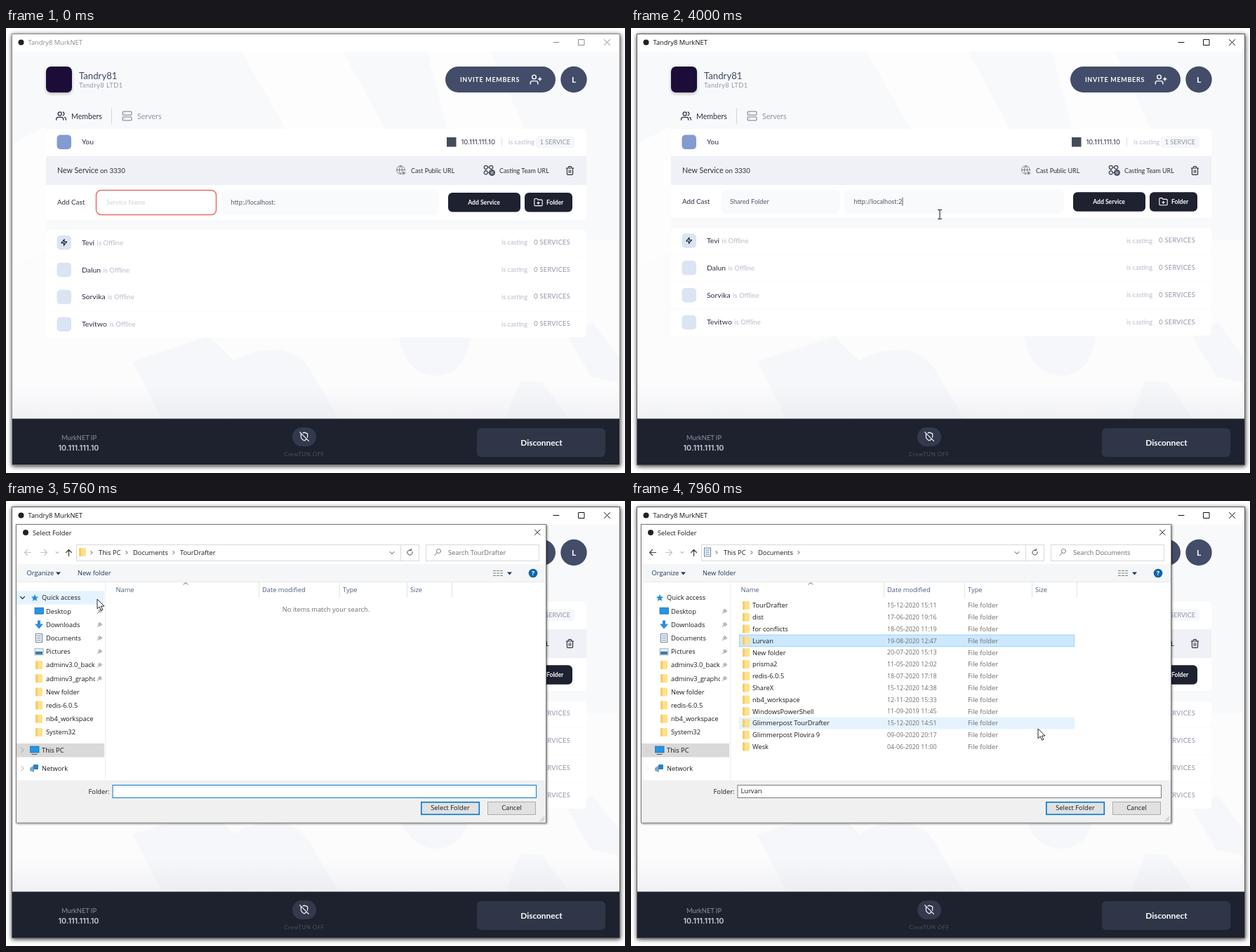
Write an HTML page that moves like this. It is 882x635 px and loops after 8000 ms.

```html
<!DOCTYPE html>
<html lang="en">
<head>
<meta charset="utf-8">
<title>Share a folder</title>
<style>
html, body { margin: 0; width: 100%; height: 100%; overflow: hidden; background: #fff; }
svg { display: block; width: 882px; height: 635px; }
text { font-family: Lato, sans-serif; white-space: pre; }
.win text { font-family: "Open Sans", sans-serif; }
text.ip { font-family: Inter, sans-serif; }
.mid { text-anchor: middle; }
.end { text-anchor: end; }
.bold { font-weight: 700; }
.line { fill: none; stroke-linecap: round; stroke-linejoin: round; }
</style>
</head>
<body>
<svg id="stage" viewBox="0 0 882 635"></svg>
<script>
const $ = id => document.getElementById(id);
const text = (x, y, s, size, fill, attr = '') =>
  `<text x="${x}" y="${(y + size * .36).toFixed(2)}" font-size="${size}" fill="${fill}" ${attr}>${s}</text>`;
const ui = (x, y, s, fill = '#1a1a1a', attr = '') => text(x, y, s, 9.3, fill, attr);
const rect = (x, y, w, h, fill, rx = 0, attr = '') =>
  `<rect x="${x}" y="${y}" width="${w}" height="${h}" rx="${rx}" fill="${fill}" ${attr}/>`;
const path = (d, color, width = 1, attr = '') =>
  `<path class="line" d="${d}" stroke="${color}" stroke-width="${width}" ${attr}/>`;
const dot = (x, y, r, fill, attr = '') => `<circle cx="${x}" cy="${y}" r="${r}" fill="${fill}" ${attr}/>`;
// 24-unit icon centred on x, y
const icon = (name, x, y, size, color, width = 2) =>
  path(ICONS[name], color, width, `transform="translate(${x - size / 2} ${y - size / 2}) scale(${size / 24})"`);

const ICONS = {
  users: 'M17 21v-2a4 4 0 0 0-4-4H5a4 4 0 0 0-4 4v2M23 21v-2a4 4 0 0 0-3-3.87M16 3.13a4 4 0 0 1 0 7.75M13 7a4 4 0 1 1-8 0 4 4 0 0 1 8 0z',
  invite: 'M16 21v-2a4 4 0 0 0-4-4H5a4 4 0 0 0-4 4v2M12.5 7a4 4 0 1 1-8 0 4 4 0 0 1 8 0zM20 8v6M23 11h-6',
  server: 'M4 2h16a2 2 0 0 1 2 2v4a2 2 0 0 1-2 2H4a2 2 0 0 1-2-2V4a2 2 0 0 1 2-2zM4 14h16a2 2 0 0 1 2 2v4a2 2 0 0 1-2 2H4a2 2 0 0 1-2-2v-4a2 2 0 0 1 2-2zM6 6h.01M6 18h.01',
  trash: 'M3 6h18M19 6v14a2 2 0 0 1-2 2H7a2 2 0 0 1-2-2V6M8 6V4a2 2 0 0 1 2-2h4a2 2 0 0 1 2 2v2M10 11v6M14 11v6',
  zap: 'M13 2 3 14h9l-1 8 10-12h-9z',
  folder: 'M22 19a2 2 0 0 1-2 2H4a2 2 0 0 1-2-2V5a2 2 0 0 1 2-2h5l2 3h9a2 2 0 0 1 2 2zM12 11v6M9 14h6',
  shield: 'M19.7 14a6.9 6.9 0 0 0 .3-2V5l-8-3-3.2 1.2M4.7 4.7 4 5v7c0 6 8 10 8 10a20.3 20.3 0 0 0 5.6-4.4M1 1l22 22',
  globe: 'M22 12a10 10 0 1 1-20 0 10 10 0 0 1 20 0zM2 12h20M12 2a15 15 0 0 1 0 20 15 15 0 0 1 0-20z',
  team: 'M10 6a4 4 0 1 1-8 0 4 4 0 0 1 8 0zM22 6a4 4 0 1 1-8 0 4 4 0 0 1 8 0zM10 18a4 4 0 1 1-8 0 4 4 0 0 1 8 0zM10 6h4M6 10v4M10 18h4'
};

const INK = '#2b3040', SLATE = '#434c69', NIGHT = '#1e2130', PALE = '#b9bdc9';
const MEMBERS = ['Tevi', 'Dalun', 'Sorvika', 'Tevitwo'];
const PLACES = ['Quick access', 'Desktop', 'Downloads', 'Documents', 'Pictures', 'adminv3.0_backup',
  'adminv3_graphql', 'New folder', 'redis-6.0.5', 'nb4_workspace', 'System32'];
const FILES = `TourDrafter|15-12-2020 15:11
dist|17-06-2020 19:16
for conflicts|18-05-2020 11:19
Lurvan|19-08-2020 12:47
New folder|20-07-2020 15:13
prisma2|11-05-2020 12:02
redis-6.0.5|18-07-2020 17:18
ShareX|15-12-2020 14:38
nb4_workspace|12-11-2020 15:33
WindowsPowerShell|11-09-2019 11:45
Glimmerpost TourDrafter|15-12-2020 14:51
Glimmerpost Plovira 9|09-09-2020 20:17
Wesk|04-06-2020 11:00`.split('\n').map(line => line.split('|'));
const fileY = i => 149 + 16.8 * i;
const placeY = i => 138 + 19.2 * i;

function backdrop() {
  const grey = '#f6f7fa', white = '#fdfdfe';
  return rect(9, 33, 865, 525, '#fcfcfd') +
    rect(9, 33, 865, 270, '#f8f9fb') +
    `<path fill="${white}" d="M335 33H480L565 190H425zM600 33H690L760 190H640zM9 165 57 140V320L9 340z"/>` +
    `<path fill="${grey}" d="M180 476 290 440 325 475Q350 458 390 459 425 465 440 500L474 557H222z
      M560 440H662Q655 496 611 496 568 492 560 440zM733 503 764 505 801 557H712zM800 440 836 420 874 470V506L834 498z"/>` +
    rect(9, 510, 865, 48, 'url(#fade)');
}

function titleBar() {
  return rect(9, 9, 865, 24.5, '#fff') + dot(21.5, 20.5, 4, '#222') +
    `<g id="title" class="win">${ui(31.5, 20.5, 'Tandry8 MurkNET', 'currentColor')}
    ${path('M780 20.5h8M816 16.5h8v8h-8zM852.5 16.5l8 8M860.5 16.5l-8 8', 'currentColor')}</g>`;
}

function app() {
  const members = MEMBERS.map((name, i) => {
    const y = 306 + 38.8 * i;
    return rect(57, y - 18, 770, 37.2, '#fff', i % 3 ? 0 : 5) + rect(72.5, y - 10, 20.5, 20.5, '#dbe4f3', 5) +
      (i ? '' : icon('zap', 82.7, y, 10.5, '#1a1d28', 2.4)) +
      `<text x="108" y="${y + 3.8}" font-size="10.4" fill="${INK}">${name}<tspan dx="3.5" font-size="9.5" fill="${PALE}">is Offline</tspan></text>` +
      text(743, y, 'is casting', 9.2, PALE, 'class="end"') +
      text(804, y - .5, '0 SERVICES', 9.2, '#8f95a6', 'class="end" letter-spacing=".3"');
  }).join('');

  return rect(8.5, 8.5, 866, 615, '#fff', 0, 'id="frame" filter="url(#shadow)"') + backdrop() + titleBar() +
    rect(57, 55, 37, 37, '#1c0b38', 7, 'filter="url(#soft)"') +
    text(104, 68, 'Tandry81', 13.2, '#3f4863') +
    text(104, 81.5, 'Tandry8 LTD1', 9.4, '#9096aa', 'letter-spacing=".4"') +
    rect(626, 55, 157, 37, SLATE, 18.5) +
    text(647, 73.5, 'INVITE MEMBERS', 9, '#fff', 'class="bold" letter-spacing=".7"') +
    icon('invite', 755, 73.5, 17, '#fff') +
    dot(809, 73.5, 18.7, SLATE) + text(809, 73.5, 'L', 12, '#fff', 'class="mid bold"') +
    icon('users', 78.5, 125.5, 15, INK) + text(93, 125.8, 'Members', 10.6, INK) +
    path('M150.5 115v22', '#d3d6de') +
    icon('server', 172.5, 125.5, 15.5, '#8d93a5') + text(187, 125.8, 'Servers', 10.6, '#8d93a5') +
    // own row and its service
    rect(57, 144, 770, 39, '#fff', 5) + rect(72.5, 152.5, 20.5, 20.5, '#829bd0', 5) +
    text(108, 162.5, 'You', 10.4, INK) + rect(628, 156, 13.5, 13.5, '#444b5a') +
    text(648.5, 162.5, '10.111.111.10', 9.5, INK, 'class="ip"') +
    path('M706.5 157v11', '#dfe1e8') + text(753, 162.5, 'is casting', 9.2, PALE, 'class="end"') +
    rect(755, 154, 55, 17, '#f6f7fa', 4) + text(804, 162.5, '1 SERVICE', 9.1, '#8f95a6', 'class="end"') +
    rect(57, 183, 770, 41, '#eff1f7') +
    text(73, 203.5, 'New Service', 10.7, INK) + text(134, 204, 'on 3330', 9.7, INK) +
    icon('globe', 562.5, 202.5, 14, '#777e91', 1.7) + dot(567, 207, 3.4, '#e4e8e0') + path('M566 205.5l2.5 1.5-2.5 1.5z', '#444', .8) +
    text(577, 203.5, 'Cast Public URL', 8.9, INK) +
    icon('team', 687.5, 202.5, 15, '#3f4554') + dot(692.5, 206.5, 4.5, '#4d5361') + path('M691.5 205v3M693.5 205v3', '#fff', .8) +
    text(703, 203.5, 'Casting Team URL', 8.9, INK) + icon('trash', 803.5, 203.5, 14, INK) +
    // new cast form
    `<rect id="formBack" x="57" y="224" width="770" fill="#fff"/><rect id="nameBox" x="128.5" rx="7"/>` +
    `<rect id="urlBox" y="231" rx="7" fill="#f9fafc"/>
    <g id="form">${text(73, 248.5, 'Add Cast', 9.8, INK)}
    ${text(0, 248.5, '', 9.2, '#555b6b', 'id="name"')}${text(0, 248.5, '', 9.2, '#555b6b', 'id="url"')}
    ${path('M0 243v11', '#333', .8, 'id="caret"')}
    ${rect(630, 235, 103, 27.5, NIGHT, 6)}${text(681, 248.5, 'Add Service', 8.6, '#fff', 'class="mid bold"')}
    ${rect(739, 235, 68, 27.5, NIGHT, 6, 'id="folderButton"')}${icon('folder', 758.5, 248.5, 13.5, '#fff')}
    ${text(770, 248.5, 'Folder', 8.6, '#fff', 'class="bold"')}</g>
    <g id="members">${members}</g>` +
    // footer
    rect(9, 557.5, 865, 65.5, '#1e222f') +
    text(104, 584.5, 'MurkNET IP', 9.3, '#8a90a3', 'class="mid"') +
    text(103.5, 599.5, '10.111.111.10', 10.8, '#c9ccd6', 'class="mid ip" font-weight="600"') +
    rect(408, 570, 34, 27, '#333a4d', 13.5) + icon('shield', 425, 583, 14, '#fff') +
    text(425, 608, 'CrewTUN OFF', 8, '#4b5162', 'class="mid" letter-spacing=".5"') +
    rect(671, 571, 183, 41, '#2f3648', 6) + text(763, 591.5, 'Disconnect', 11.9, '#fff', 'class="mid bold"');
}

const folder = (x, y) => rect(x - 5, y - 6, 10, 12, '#ffe08c', 1) + rect(x - 5, y - 6, 3, 12, '#f3cd68', 1);
const sheet = (x, y) => rect(x - 4.5, y - 6, 9, 12, '#fff', 0, 'stroke="#68809a"') +
  path(`M${x - 2.5} ${y - 3}h5m-5 3h5m-5 3h5`, '#4d82b5', 1);
const screen = (x, y) => rect(x - 6, y - 5, 12.5, 9, '#2196e8', 0, 'stroke="#286090" stroke-width=".7"');
const chevron = (x, y) => path(`M${x - 1} ${y - 2}l2 2-2 2`, '#444');

function dialog() {
  const placeIcons = [
    y => `<path d="M41 ${y - 5}l1.5 3.4 3.6.4-2.7 2.4.8 3.6-3.2-1.9-3.2 1.9.8-3.6-2.7-2.4 3.6-.4z" fill="#2a8fd8"/>`,
    y => screen(47, y),
    y => `<path d="M45 ${y - 6}h4v5h4l-6 7-6-7h4z" fill="#2b8be0"/>`,
    y => sheet(47, y),
    y => rect(41, y - 4, 12, 9, '#e8f2fa', 0, 'stroke="#7890a5" stroke-width=".7"') + rect(42, y, 10, 4, '#3678a8')
  ];
  const places = PLACES.map((name, i) => {
    const y = placeY(i);
    return (placeIcons[i] || (y => folder(47, y)))(y) + ui(i ? 57 : 51, y, name, '#1a1a1a', 'clip-path="url(#side)"') +
      (i > 0 && i < 7 ? path(`M130.5 ${y + 3}l2-2m-1-2l3 3m-2-4l3 3m-2-4l3 3`, '#777') : '');
  }).join('');
  const files = FILES.map(([name, date], i) => folder(164, fileY(i)) + ui(173, fileY(i), name) +
    text(365, fileY(i), date, 8.8, '#6d6d6d') + ui(480, fileY(i), 'File folder', '#6d6d6d')).join('');

  return `<g id="dialog" class="win">` +
    rect(14.5, 33.5, 755, 425.5, '#fff', 0, 'filter="url(#edge)" stroke="#7c7c7c"') +
    dot(28, 45, 4, '#222') + ui(38, 45.5, 'Select Folder') + path('M753.5 41l7.5 7.5M761 41l-7.5 7.5', '#222') +
    path('M26.5 73.5h9m-9 0l4-4m-4 4l4 4', 'currentColor', 1.2, 'id="back"') +
    path('M49.5 73.5h9m0 0l-4-4m4 4l-4 4M71 72.5l2 2 2-2', '#c4c4c4', 1.2) +
    path('M89.5 78.5v-9m0 0l-4 4m4-4l4 4', '#444', 1.2) +
    rect(100.5, 62.5, 488, 23, '#fff', 0, 'stroke="#d9d9d9"') + path('M562.5 63v22', '#d9d9d9') +
    path('M547 72.5l3 3 3-3M579 72.5a3.6 3.6 0 1 1-2-2.3m.3-2v2.5h-2.5', '#444') +
    rect(598.5, 62.5, 161, 23, '#fff', 0, 'stroke="#d9d9d9"') +
    path('M619.5 71.5a3 3 0 1 1-6 0 3 3 0 0 1 6 0M614 74l-3 3.5', '#777') +
    rect(178, 65, 66, 18, '#e5f3ff', 0, 'id="crumb" stroke="#cce8ff"') +
    chevron(122, 73.5) + ui(132, 73.5, 'This PC') + chevron(172, 73.5) + ui(181, 73.5, 'Documents') + chevron(239, 73.5) +
    rect(15, 90, 754, 25.5, '#f5f6f7') + path('M16 115.5h753', '#e8e8ea') +
    ui(29.5, 103, 'Organize', '#1e395b') + ui(102, 103, 'New folder', '#1e395b') +
    '<path d="M71 101.5h7l-3.5 4zM714 101.5h7l-3.5 4z" fill="#1e395b"/>' +
    path('M694.5 99.5h3m2 0h3m2 0h3M694.5 103h3m2 0h3m2 0h3M694.5 106.5h3m2 0h3m2 0h3', '#777') +
    dot(751, 103, 6.3, '#0a64ad') + ui(751, 103, '?', '#fff', 'class="mid bold"') +
    path('M141.5 116v282', '#eee') + path('M360.5 116v21M475.5 116v21M571.5 116v21M635.5 116v21', '#e3e3e3') +
    path('M253 119l3-2.5 3 2.5', '#666') +
    ui(156.5, 126.5, 'Name', '#4c607a') + ui(365, 126.5, 'Date modified', '#4c607a') +
    ui(480, 126.5, 'Type', '#4c607a') + ui(576, 126.5, 'Size', '#4c607a') +
    rect(15, 346, 125, 19.5, '#d9d9d9') +
    `<rect id="hover" fill="#e5f3ff"/>` + places +
    screen(40.5, 355) + path('M37 361.5h7', '#555') + ui(51, 355.5, 'This PC') +
    `<path d="M34 381l6-4v10l-6-2z" fill="#7ea8c8"/>` + rect(39, 376, 7, 7, '#2f80c8', 1) + ui(51, 381.5, 'Network') +
    path('M20.5 136.5l3 3 3-3', '#333', 1.2, 'id="opened"') +
    path('M22 352.5l3 3-3 3M22 378.5l3 3-3 3', '#999', 1, 'id="closed"') +
    rect(154.5, fileY(3) - 8.3, 477, 16.6, '#cce8ff', 0, 'id="picked" stroke="#99d1ff"') +
    `<g id="empty">${folder(109, 73)}${ui(248, 73.5, 'TourDrafter')}${ui(630, 73.5, 'Search TourDrafter', '#6d6d6d')}
    ${ui(456, 154.5, 'No items match your search.', '#6d6d6d', 'class="mid"')}</g>` +
    `<g id="files">${sheet(109, 73)}${ui(630, 73.5, 'Search Documents', '#6d6d6d')}${files}</g>` +
    rect(15, 398.5, 754, 60, '#f0f0f0') + ui(147.5, 414.5, 'Folder:', '#1a1a1a', 'class="end"') +
    rect(152, 405.5, 603.5, 18, '#fff', 0, 'id="fieldBox"') + rect(156, 407.5, 50.5, 13, '#0078d7', 0, 'id="selection"') +
    ui(156.5, 414, '', '#1a1a1a', 'id="field"') +
    rect(591.8, 429.8, 82.5, 17.5, '#e1e1e1', 0, 'stroke="#0078d7" stroke-width="1.6"') + ui(633, 438, 'Select Folder', '#1a1a1a', 'class="mid"') +
    rect(686.5, 429.5, 68, 18, '#e1e1e1', 0, 'stroke="#adadad"') + ui(720.5, 438, 'Cancel', '#1a1a1a', 'class="mid"') +
    path('M761 456.5l6-6M764 456.5l3-3', '#aaa') + '</g>';
}

$('stage').innerHTML = `<defs>
  <linearGradient id="fade" x2="0" y2="1"><stop stop-color="#dfe1e8" stop-opacity="0"/><stop offset="1" stop-color="#dfe1e8" stop-opacity=".4"/></linearGradient>
  <filter id="shadow" x="-5%" y="-5%" width="110%" height="110%"><feDropShadow dx=".5" dy="1.5" stdDeviation="3.2" flood-opacity=".8"/></filter>
  <filter id="edge" x="-5%" y="-5%" width="110%" height="110%"><feDropShadow dx="1" dy="1" stdDeviation="1.6" flood-opacity=".55"/></filter>
  <filter id="soft" x="-20%" y="-20%" width="140%" height="150%"><feDropShadow dx="0" dy="2" stdDeviation="2" flood-opacity=".25"/></filter>
  <clipPath id="side"><path d="M40 120h87v230H40z"/></clipPath></defs>` + app() + dialog() +
  `<g id="cursor">${dot(-.5, -.5, 9.5, '#d0c81c', 'id="click" opacity=".85"')}
  <path id="arrow" d="M0 0v13.8l3.2-3 2.4 5.5 2.2-1-2.4-5.2h4.6z" fill="#fff" stroke="#111" stroke-width=".9"/>
  ${path('M-2.5 -6.5h2l.5.5.5-.5h2M0-6v12M-2.5 6.5h2l.5-.5.5.5h2', '#111', 1, 'id="beam"')}</g>`;

const LOOP = 8000, ACTIVE = 720, OPEN = 5360, LISTED = 6400, BLUR = 7160, PICK = 7720;
const NAME_KEYS = [1080, 1280, 1400, 1480, 1600, 1760, 1920, 2080, 2400, 2480, 2640, 2760, 2840];
const PORT_KEYS = [4000, 4080, 4200, 4320];
const CLICKS = [720, 3440, 4960, 6360, 7720];
const ROUTE = [[40, 420, 470], [400, 262, 300], [840, 189, 252], [3120, 189, 252], [3560, 440, 266], [4560, 440, 266],
  [4960, 772, 245], [5120, 772, 245], [5400, 335, 405], [5600, 200, 255], [5760, 130, 140], [5920, 132, 102],
  [6240, 196, 88], [6340, 205, 76], [6520, 205, 76], [7000, 205, 143], [7120, 205, 146], [7440, 215, 258],
  [7520, 216, 268], [7720, 208, 203], [7840, 209, 203], [7920, 400, 254], [7960, 580, 325]];

function cursorAt(t) {
  const next = ROUTE.findIndex(stop => stop[0] > t);
  if (next < 1) return ROUTE[next < 0 ? ROUTE.length - 1 : 0].slice(1);
  const [t0, x0, y0] = ROUTE[next - 1], [t1, x1, y1] = ROUTE[next];
  const k = (t - t0) / (t1 - t0);
  return [x0 + (x1 - x0) * k, y0 + (y1 - y0) * k];
}

const show = (id, on) => $(id).style.display = on ? '' : 'none';
const set = (id, attrs) => { for (const key in attrs) $(id).setAttribute(key, attrs[key]); };
const typed = (s, keys, t) => s.slice(0, keys.filter(k => k <= t).length);

function drawForm(t, x, y, open) {
  const name = typed('Shared Folder', NAME_KEYS, t), valid = name !== '';
  set('formBack', { height: valid ? 47 : 49.5 });
  set('nameBox', valid
    ? { y: 231, width: 169, height: 34, fill: '#f9fafc', stroke: 'none' }
    : { y: 231.5, width: 171, height: 35, fill: '#fff', stroke: '#ec6b64', 'stroke-width': 1.5 });
  set('urlBox', valid ? { x: 304, width: 313, height: 34 } : { x: 307, width: 310, height: 36 });
  set('form', { transform: `translate(0 ${valid ? -.8 : 0})` });
  set('members', { transform: `translate(0 ${valid ? -2.7 : 0})` });
  $('name').textContent = name || 'Service Name';
  set('name', { x: valid ? 141 : 143, fill: valid ? '#555b6b' : '#d0d3db' });
  $('url').textContent = 'http://localhost:' + typed('2210', PORT_KEYS, t);
  set('url', { x: valid ? 317.5 : 320.5 });

  const inUrl = t >= 3480, input = inUrl ? $('url') : $('name');
  show('caret', valid && t < 4960 && !(t >= 3840 && t < 4000));
  set('caret', { transform: `translate(${+input.getAttribute('x') + input.getComputedTextLength() + .7} 0)` });
  const over = !open && x > 739 && x < 807 && y > 234 && y < 262;
  set('folderButton', { fill: over ? '#6c717e' : NIGHT });
}

function drawDialog(t, x, y) {
  const listed = t >= LISTED, picked = t >= PICK, selected = listed && t < BLUR;
  show('empty', !listed);
  show('files', listed);
  show('picked', picked);
  show('selection', selected);
  show('crumb', t >= 6280 && t < 6680);
  set('back', { color: listed ? '#444' : '#c4c4c4' });
  set('opened', { opacity: Math.max(0, Math.min(1, (6720 - t) / 320)) });
  set('closed', { opacity: Math.max(.2, Math.min(1, (6720 - t) / 320)) });
  $('field').textContent = picked ? 'Lurvan' : listed ? 'Documents' : '';
  set('field', { fill: selected ? '#fff' : '#1a1a1a' });
  set('fieldBox', { stroke: t < BLUR ? '#0078d7' : '#7a7a7a' });

  const file = Math.floor((y - 140.6) / 16.8), place = Math.round((y - 138) / 19.2);
  const overFile = listed && x > 154 && x < 632 && file >= 0 && file < FILES.length;
  const overPlace = x < 141 && place >= 0 && place < PLACES.length;
  show('hover', overFile || overPlace);
  set('hover', overFile
    ? { x: 154, y: fileY(file) - 8.4, width: 478, height: 16.8 }
    : { x: 15, y: placeY(place) - 9.6, width: 125, height: 19.2 });
}

function draw(t) {
  const [x, y] = cursorAt(t), open = t >= OPEN;
  set('title', { color: t >= ACTIVE ? '#111' : '#8c8c8c' });
  set('frame', { stroke: t >= ACTIVE ? '#5c5c5c' : '#8a8a8a' });
  drawForm(t, x, y, open);
  show('dialog', open);
  if (open) drawDialog(t, x, y);

  const beam = !open && y > 231 && y < 267 && x > 128 && x < 617;
  show('cursor', t >= 40);
  set('cursor', { transform: `translate(${x} ${y})` });
  show('beam', beam);
  show('arrow', !beam);
  show('click', CLICKS.some(c => t >= c && t < c + 120));
}

function tick() {
  draw(Math.floor(performance.now() % LOOP / 40) * 40);
  requestAnimationFrame(tick);
}
tick();
</script>
</body>
</html>
```
